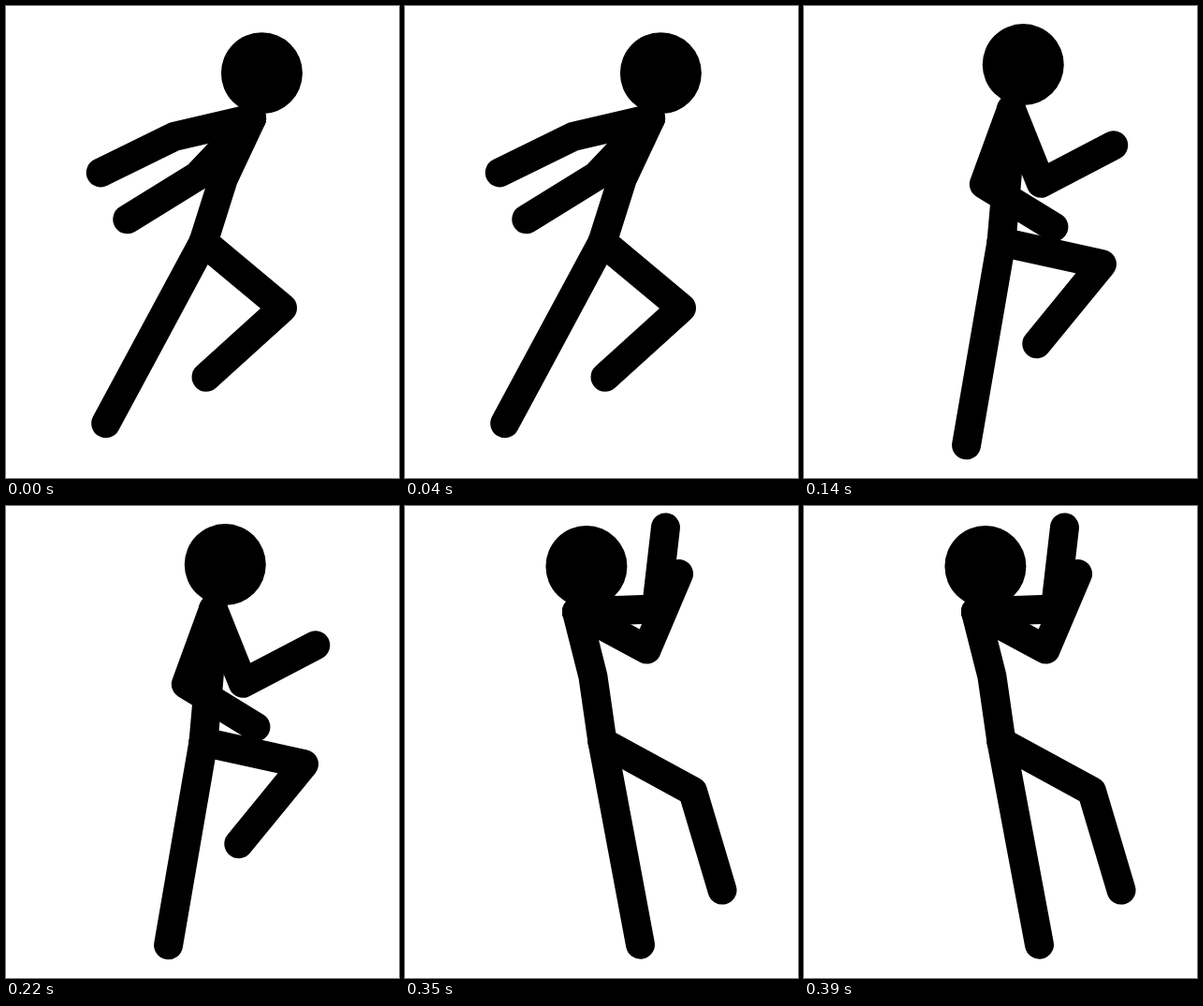
Recreate the animation shown at these times as an HTML page with a canvas. Size 420 px wide and 504 px high, loop 0.42 s.

```html
<!DOCTYPE html>
<html>
<head>
<meta charset="utf-8">
<title>Running stick figure</title>
<style>
html, body { margin: 0; width: 100%; height: 100%; overflow: hidden; background: #fff; }
canvas { display: block; }
</style>
</head>
<body>
<canvas id="stage" width="420" height="504"></canvas>
<script>
const ctx = document.getElementById('stage').getContext('2d');
const LOOP = 420;
const HIP = [211, 252];
const BONE = { spine: [71, 71], neck: [49.5], arm: [85, 87.5], leg: [110, 110] };
const HEAD_RADIUS = 43.5;

// Bone directions in degrees, clockwise from straight up.
const lean = { spine: [-8.2, -14.2], neck: [12.2], legs: [[169.4, 169.4], [118.6, 163.4]] };
const poses = [
  { start: 0, spine: [17.5, 25.2], neck: [12.6],
    arms: [[-103.2, -116.1], [-136.6, -121.7]], legs: [[-151.7, -151.7], [129.8, -132.2]] },
  { start: 70, spine: [14, 21.8], neck: [8.9],
    arms: [[-121.9, -157.5], [-147.5, 162]], legs: [[-159, -159], [114.6, -146.8]] },
  { start: 140, spine: [5, 3.5], neck: [14.9],
    arms: [[158.1, 62.4], [-159.9, 121.5]], legs: [[-170.2, -170.2], [102.4, -140.7]] },
  { start: 280, ...lean, arms: [[103.4, 22.4], [132.2, 36.3]] },
  { start: 350, ...lean, arms: [[88, 6.6], [118.2, 23]] }
];

// Follows a chain of bones and returns its last joint.
function chain([x, y], lengths, angles) {
  ctx.beginPath();
  ctx.moveTo(x, y);
  lengths.forEach((length, i) => {
    const a = angles[i] * Math.PI / 180;
    x += length * Math.sin(a);
    y -= length * Math.cos(a);
    ctx.lineTo(x, y);
  });
  return [x, y];
}

function limb(from, lengths, angles) {
  const end = chain(from, lengths, angles);
  ctx.stroke();
  return end;
}

function draw({ spine, neck, arms, legs }) {
  ctx.clearRect(0, 0, 420, 504);
  ctx.lineWidth = 31;
  ctx.lineCap = ctx.lineJoin = 'round';
  const shoulder = limb(HIP, BONE.spine, spine);
  arms.forEach(arm => limb(shoulder, BONE.arm, arm));
  legs.forEach(leg => limb(HIP, BONE.leg, leg));
  const head = chain(shoulder, BONE.neck, neck);
  ctx.beginPath();
  ctx.arc(...head, HEAD_RADIUS, 0, 2 * Math.PI);
  ctx.fill();
}

// Poses are held and switch abruptly.
function tick() {
  const t = performance.now() % LOOP;
  draw(poses.findLast(pose => pose.start <= t));
  requestAnimationFrame(tick);
}
tick();
</script>
</body>
</html>
```
